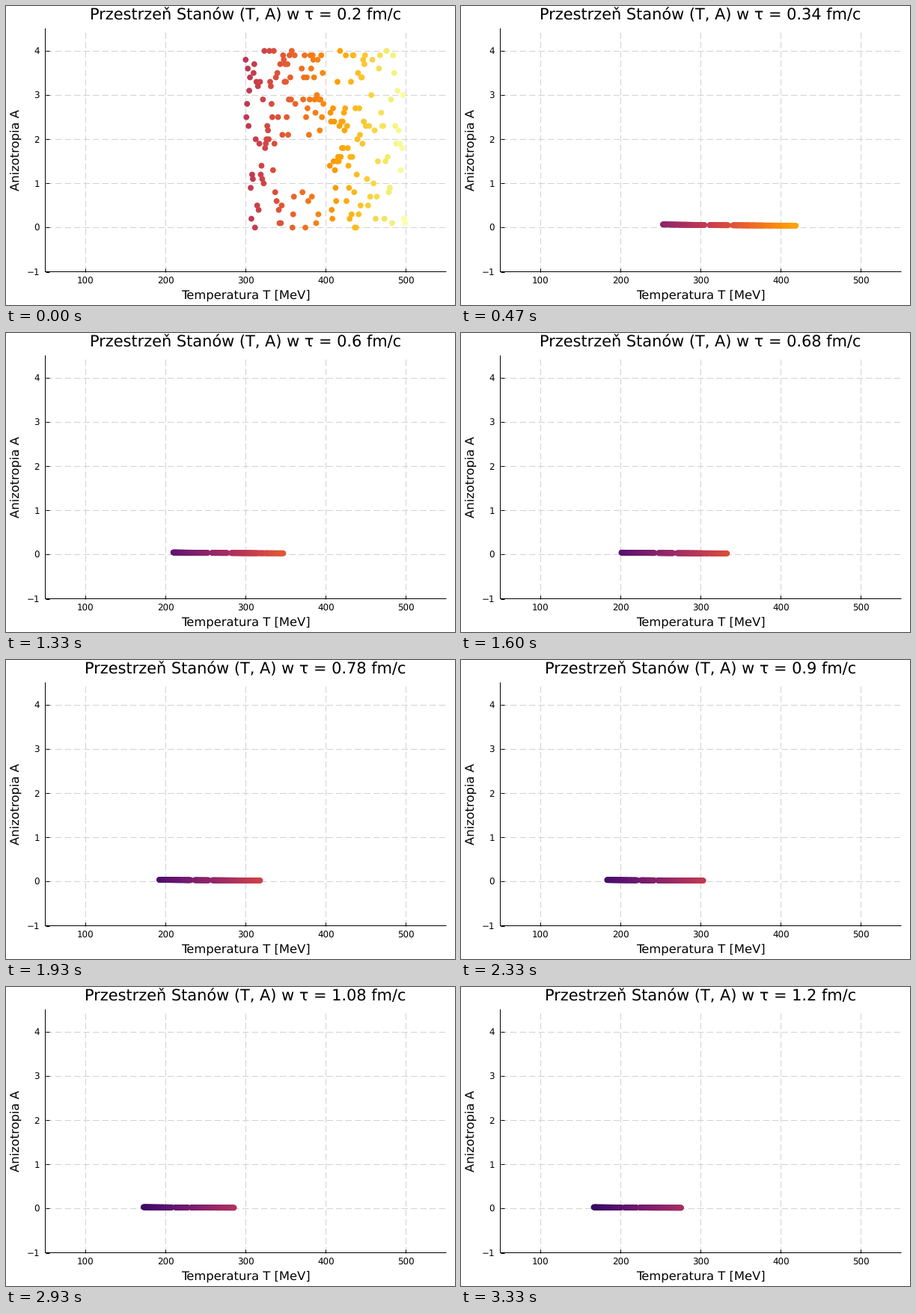
Recreate the animation shown at these times as a matplotlib script. Size 600 px wide and 400 px high, loop 3.39 s.

```python
import matplotlib.pyplot as plt
import numpy as np
from matplotlib.animation import FuncAnimation

W, H, DPI = 600, 400, 100
PX = 72 / DPI  # one pixel in points
LOOP_MS, FRAMES = 3390, 51
TAU0, DTAU, SUBSTEPS = 0.2, 0.02, 40
C_ETA, C_TAU = 0.75, 1.16
LEFT, RIGHT, TOP, BOTTOM = 52.5, 588, 30.5, 355.5


def start_state():
    """Random cloud of temperatures (MeV) and anisotropies in steps of 0.1."""
    rng = np.random.default_rng(7)
    bands = [(300, 362, 70), (370, 397, 31), (405, 449, 56), (450, 499, 37)]
    temp = np.concatenate([np.linspace(*band) for band in bands])
    aniso = rng.integers(0, 41, len(temp)) / 10
    # the middle of the cloud stays empty
    hollow = (temp > 340) & (temp < 404) & (aniso > 0.9) & (aniso < 2.1)
    aniso[hollow] += 1.9
    return np.array([temp, aniso])


def flow(tau, state):
    """Boost-invariant Mueller-Israel-Stewart equations."""
    t, a = state
    dt = t / tau * (a / 18 - 1 / 3)
    da = (8 * C_ETA / tau - t * a) / C_TAU - 2 * a**2 / (9 * tau)
    return np.array([dt, da])


def evolve():
    """Runge-Kutta integration, one stored state per frame."""
    state, tau, h = start_state(), TAU0, DTAU / SUBSTEPS
    states = [state]
    for _ in range(FRAMES - 1):
        for _ in range(SUBSTEPS):
            k1 = flow(tau, state)
            k2 = flow(tau + h / 2, state + h / 2 * k1)
            k3 = flow(tau + h / 2, state + h / 2 * k2)
            k4 = flow(tau + h, state + h * k3)
            state = state + h / 6 * (k1 + 2 * k2 + 2 * k3 + k4)
            tau += h
        states.append(state)
    return states


plt.rcParams.update({"font.family": "DejaVu Sans", "text.hinting": "none"})
fig = plt.figure(figsize=(W / DPI, H / DPI), dpi=DPI, facecolor="white")


def label(x, y, text, size, ha="center", **kw):
    return fig.text(x / W, 1 - y / H, text, fontsize=size * PX,
                    ha=ha, va="baseline", **kw)


ax = fig.add_axes([LEFT / W, 1 - BOTTOM / H, (RIGHT - LEFT) / W, (BOTTOM - TOP) / H])
ax.set(xlim=(50, 550), ylim=(-1, 4.5), xticks=range(100, 501, 100), yticks=range(-1, 5))
ax.set_axisbelow(True)
ax.spines[["top", "right"]].set_visible(False)
for side in ("left", "bottom"):
    ax.spines[side].set(linewidth=PX, snap=False)
ax.tick_params(direction="in", length=5 * PX, width=PX, labelbottom=False, labelleft=False)
ax.grid(color="#d2d2d2", linewidth=PX, linestyle=(0, (8.5, 4)))

for x in range(100, 501, 100):
    label(LEFT + (x - 50) * (RIGHT - LEFT) / 500, 371.9, str(x), 11.9)
for y in range(-1, 5):
    text = str(y).replace("-", "\u2212")
    label(45, BOTTOM - (y + 1) * (BOTTOM - TOP) / 5.5 + 4.4, text, 11.9, ha="right")
label(320.5, 392, "Temperatura T [MeV]", 16.37)
label(17.4, 193, "Anizotropia A", 16.37, rotation=90, rotation_mode="anchor")
title = label(320.2, 18.4, "", 20.83)

states = evolve()
dots = ax.scatter(*states[0], c=states[0][0], cmap="inferno", vmin=100, vmax=500,
                  s=(7.8 * PX) ** 2, linewidths=0, zorder=3)


def draw(i):
    dots.set_offsets(states[i].T)
    dots.set_array(states[i][0])
    title.set_text(f"Przestrzeň Stanów (T, A) w τ = {round(TAU0 + DTAU * i, 2)} fm/c")
    return dots, title


anim = FuncAnimation(fig, draw, frames=FRAMES, interval=LOOP_MS / FRAMES, repeat=True)
plt.show()
```
